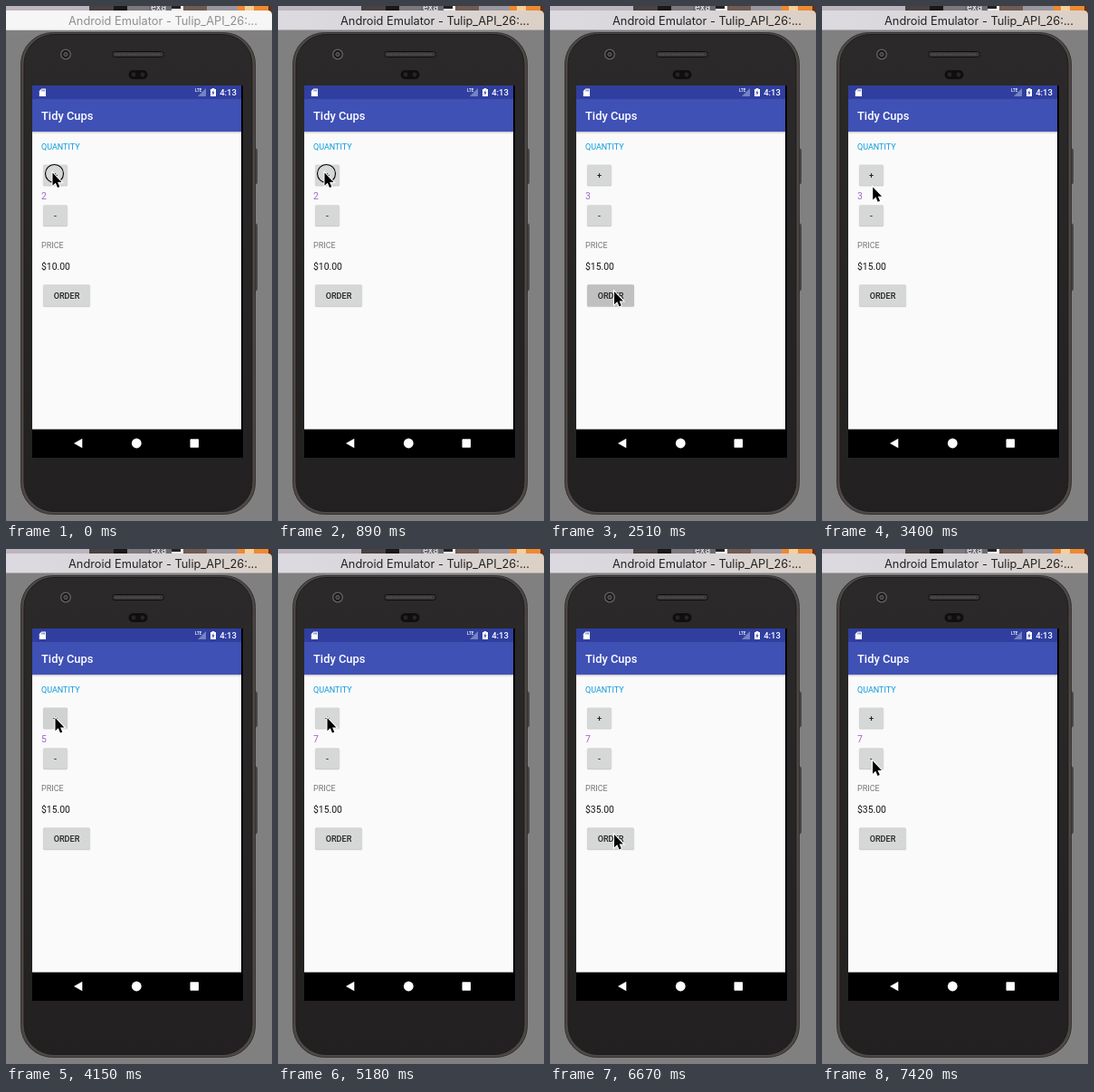
An HTML page that plays this animation: 294 by 570 pixels, repeating every 8 s.

```html
<!DOCTYPE html>
<html lang="en">
<head>
<meta charset="utf-8">
<title>Emulator demo</title>
<style>
html, body { margin: 0; width: 100%; height: 100%; overflow: hidden; background: #808080; }
svg { display: block; width: 294px; height: 570px; }
text { font-family: Roboto, sans-serif; white-space: pre; }
.medium { font-weight: 500; }
.title { font-family: Inter, sans-serif; }
</style>
</head>
<body>
<svg viewBox="0 0 294 570" xmlns="http://www.w3.org/2000/svg">
  <defs>
    <linearGradient id="bar">
      <stop offset="0" stop-color="#dcd9e0"/><stop offset=".6" stop-color="#dad6d8"/><stop offset="1" stop-color="#dcd0c4"/>
    </linearGradient>
    <linearGradient id="shade" x1="0" y1="0" x2="0" y2="1">
      <stop offset="0" stop-color="#000" stop-opacity=".22"/><stop offset="1" stop-color="#000" stop-opacity="0"/>
    </linearGradient>
    <linearGradient id="body" x1="0" y1="0" x2="0" y2="1">
      <stop offset="0" stop-color="#2c292a"/><stop offset="1" stop-color="#232021"/>
    </linearGradient>
  </defs>

  <rect width="294" height="570" fill="#808080"/>

  <!-- desktop strip above the window -->
  <g>
    <rect width="294" height="10" fill="#bdb5be"/>
    <rect x="92" width="27" height="10" fill="#4a4143"/>
    <rect x="119" width="15" height="10" fill="#1b1817"/>
    <rect x="134" width="24" height="10" fill="#7d787b"/>
    <rect x="158" width="25" height="10" fill="#6d6b72"/>
    <text x="160" y="4.5" font-size="11" fill="#f0f0f0">exa</text>
    <rect x="183" width="13" height="10" fill="#f0eeee"/>
    <rect x="183" width="10" height="3" fill="#222"/>
    <rect x="196" width="26" height="10" fill="#6e5b52"/>
    <rect x="222" width="34" height="10" fill="#9a969f"/>
    <rect x="256" width="34" height="10" fill="#ee8a30"/>
    <rect x="264" width="10" height="10" fill="#f8cf9a"/>
    <rect x="290" width="4" height="10" fill="#5b3524"/>
  </g>

  <!-- window title bar -->
  <path id="titleBar" d="M0 27V5H289Q294 5 294 10V27Z"/>
  <rect id="titleEdge" y="26" width="294" height="1" fill="#b0aeb0"/>
  <text id="title" class="title" x="69" y="21" font-size="12.8">Android Emulator - Tulip_API_26:...</text>

  <!-- phone -->
  <rect x="274" y="158" width="3.4" height="39" rx="1.5" fill="#4b4745" stroke="#363331" stroke-width=".7"/>
  <rect x="274" y="241" width="3.4" height="74" rx="1.5" fill="#4b4745" stroke="#363331" stroke-width=".7"/>
  <rect x="16.5" y="29.5" width="259" height="533" rx="35" fill="#4d4845" stroke="#34302e"/>
  <rect x="20" y="31.5" width="252" height="528" rx="33" fill="url(#body)" stroke="#1f1c1c"/>
  <circle cx="66" cy="53.5" r="5.3" fill="#1b1919" stroke="#676464" stroke-width="1.3"/>
  <circle cx="66" cy="53.5" r="2.2" fill="#3c3b3b" stroke="#77716c" stroke-width=".7"/>
  <rect x="117.5" y="50.5" width="57" height="6" rx="3" fill="#3b3a39" stroke="#0e0d0d"/>
  <path d="M121 53.5H171" stroke="#5a5958" stroke-width="1.4" stroke-dasharray="1 1"/>
  <rect x="135.5" y="71" width="21" height="10" rx="5" fill="#100f0f"/>
  <circle cx="141" cy="76" r="2.4" fill="#262525"/><circle cx="151" cy="76" r="2.4" fill="#262525"/>

  <!-- screen -->
  <rect x="29" y="88" width="233" height="412" fill="#000"/>
  <rect x="29" y="139" width="231" height="329.5" fill="#fafafa"/>
  <rect x="29" y="139" width="231" height="2.5" fill="url(#shade)"/>
  <rect x="29" y="103" width="231" height="36" fill="#3f51b5"/>
  <rect x="29" y="88" width="231" height="15" fill="#303f9f"/>

  <g fill="#fff">
    <path d="M39.3 91.5H44V100H36.8V94Z"/>
    <path d="M39.8 92.5V94.5M41.2 92.5V94.5M42.6 92.5V94.5" stroke="#303f9f" stroke-width=".7"/>
    <path d="M221 91V100H212Z" opacity=".35"/>
    <text x="209" y="95.4" font-size="4.6" class="medium">LTE</text>
    <path d="M226 92H227.7V91H230.3V92H232V100H226Z"/>
    <path d="M229.6 93L227.4 96.5H228.8L228.4 99L230.6 95.5H229.2Z" fill="#303f9f"/>
    <text x="236.2" y="99" font-size="9.5" class="medium">4:13</text>
    <text x="39" y="126" font-size="12.9" class="medium">Tidy Cups</text>
    <path d="M75 484L84.3 478.8V489.2Z"/>
    <circle cx="144.3" cy="484" r="5.4"/>
    <rect x="203.5" y="479.3" width="9.5" height="9.5" rx=".7"/>
  </g>

  <text x="39" y="159" font-size="9" fill="#0a9bd8">QUANTITY</text>
  <text id="count" x="39" y="214" font-size="10.4" fill="#a464cc"></text>
  <text x="39" y="268" font-size="9" fill="#757575">PRICE</text>
  <text id="price" x="39" y="291.6" font-size="10.4" fill="#161616"></text>
  <g id="buttons"></g>

  <circle id="ring" r="10" fill="none" stroke="#000" stroke-width="1.1"/>
  <path id="cursor" d="M0 0V14.2L3.3 11.2L5.5 16.4L7.8 15.4L5.6 10.4H9.9Z" stroke="#fff" stroke-width="2" paint-order="stroke"/>
</svg>
<script>
const LOOP = 8000;
const $ = id => document.getElementById(id);

function addButton(id, y, w, h, label, base) {
  const cx = 41 + w / 2;
  $('buttons').insertAdjacentHTML('beforeend', `
    <rect x="40.6" y="${y + .6}" width="${w + .8}" height="${h + .6}" rx="2" opacity=".08"/>
    <rect x="41" y="${y + .4}" width="${w}" height="${h + .3}" rx="1.6" opacity=".12"/>
    <rect id="${id}" x="41" y="${y}" width="${w}" height="${h}" rx="1.5"/>
    <text class="medium" x="${cx}" y="${base}" font-size="9.1" fill="#212121" text-anchor="middle">${label}</text>`);
}
const GREY = '#d6d7d7';
addButton('plus', 175.5, 27, 23, '+', 190.6);
addButton('minus', 220.3, 27, 23, '-', 235.4);
addButton('order', 308.3, 52, 24, 'ORDER', 323.7);
$('minus').setAttribute('fill', GREY);

// Each track holds [time, value] pairs; a value lasts until the next pair.
const tracks = {
  count: [[0, 2], [1030, 3], [3850, 4], [4150, 5], [4440, 6], [4740, 7]],
  price: [[0, 10], [2220, 15], [6370, 35]],
  ring: [[0, 1], [1030, 0], [2070, 1], [2220, 0], [4000, 1], [4150, 0],
         [4290, 1], [4440, 0], [4590, 1], [4740, 0], [6220, 1], [6370, 0]],
  plus: [[0, GREY], [1030, '#cbcccc'], [1180, GREY], [3850, '#d0d1d1'], [4880, GREY]],
  order: [[0, GREY], [2220, '#cacaca'], [2360, '#c0c0c0'], [2960, '#cbcbcb'], [3110, GREY],
          [6220, '#cacaca'], [6370, '#c0c0c0'], [6670, GREY]]
};

// Pointer trips: start, end, destination.
const home = [51.5, 184.5];
const trips = [
  [1323, 1770, 76, 302.5],
  [1770, 2070, 71, 316],
  [2813, 3550, 54.5, 187],
  [5323, 5920, 71, 316],
  [6823, 7420, 56, 234.5]
];
const TICK = 148;

function valueAt(track, t) {
  let v = track[0][1];
  for (const [start, next] of track) if (t >= start) v = next;
  return v;
}

function pointer(t) {
  let [x, y] = home;
  for (const [start, end, tx, ty] of trips) {
    if (t < start) break;
    const steps = Math.round((end - start) / TICK);
    const p = Math.min(1, Math.floor((t - start) / (end - start) * steps + .02) / steps);
    const e = p * p * (3 - 2 * p);
    x += (tx - x) * e;
    y += (ty - y) * e;
  }
  return [x, y];
}

function draw(t) {
  const active = t >= 150;
  $('titleBar').setAttribute('fill', active ? 'url(#bar)' : '#f6f6f6');
  $('titleEdge').setAttribute('opacity', active ? 1 : .4);
  $('title').setAttribute('fill', active ? '#222' : '#8f8f8f');

  $('count').textContent = valueAt(tracks.count, t);
  $('price').textContent = '$' + valueAt(tracks.price, t).toFixed(2);
  $('plus').setAttribute('fill', valueAt(tracks.plus, t));
  $('order').setAttribute('fill', valueAt(tracks.order, t));

  const [x, y] = pointer(t);
  $('cursor').setAttribute('transform', `translate(${x} ${y})`);
  $('ring').setAttribute('transform', `translate(${x + 2} ${y + 1})`);
  $('ring').setAttribute('opacity', valueAt(tracks.ring, t));
}

const began = performance.now();
function tick() {
  draw((performance.now() - began) % LOOP);
  requestAnimationFrame(tick);
}
draw(0);
requestAnimationFrame(tick);
</script>
</body>
</html>
```
